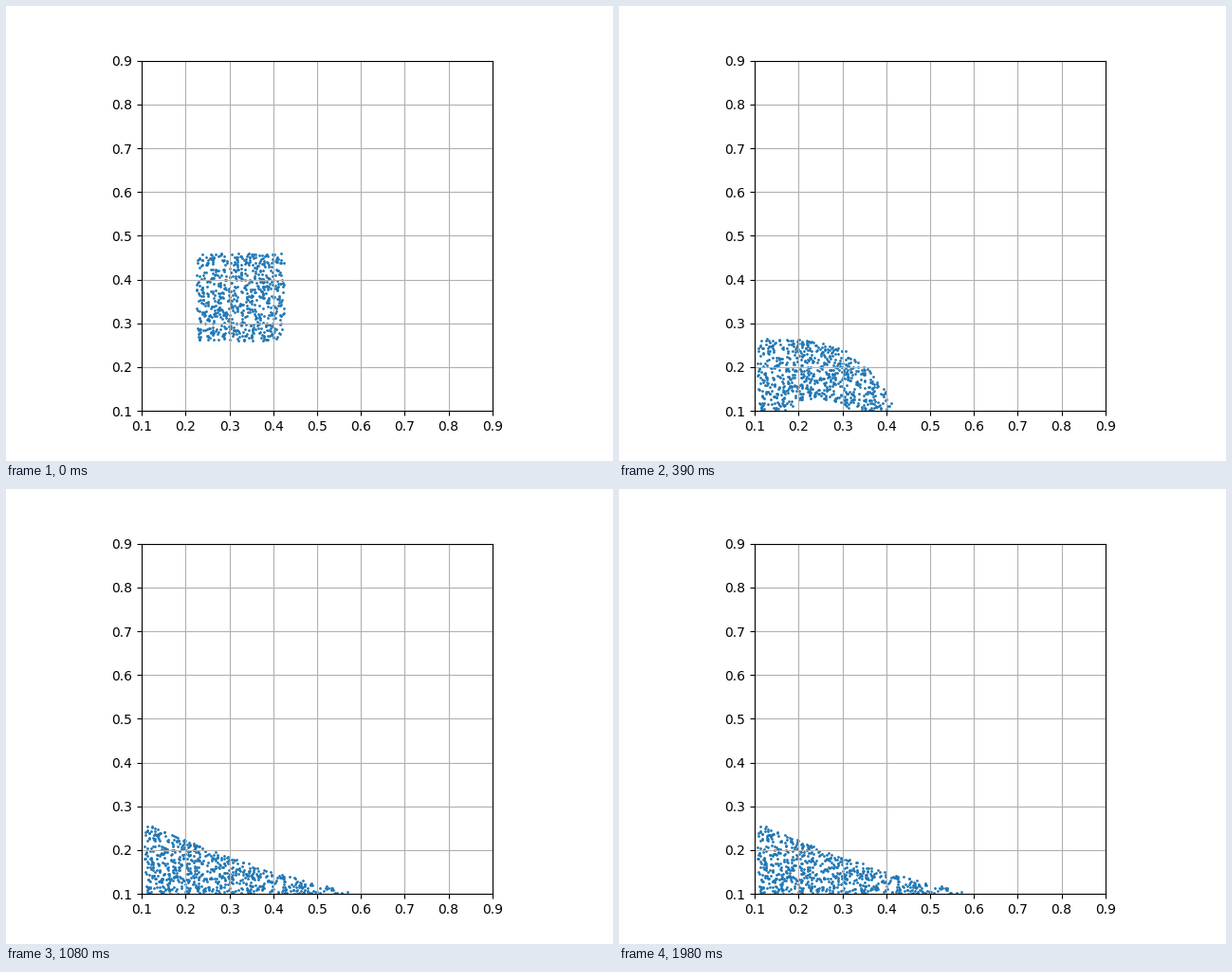
Recreate the animation shown at these times as a matplotlib script. Size 640x480 px, loop 2.1 s.

```python
import numpy as np
import matplotlib.pyplot as plt
from matplotlib.animation import FuncAnimation

FRAMES, STEP_MS = 70, 30
COUNT = 700
FLOOR, WALL = .1, .106
CONTACT, LANDED = 8, 13

rng = np.random.default_rng(7)
u, v = rng.random((2, COUNT))
grid = np.linspace(0, 1, 600)


def cumulative(f):
    c = np.concatenate([[0], np.cumsum((f[1:] + f[:-1]) / 2)])
    return c / c[-1]


def outline(s):
    """Height, width and the two curve exponents, s steps after landing."""
    height = .165 + .0163 * s * np.exp(-s / 4) - .003 * (1 - np.exp(-s / 8))
    width = .53 - .205 * np.exp(-s / 6)
    p = 1.42 - .22 * np.exp(-s / 6)
    q = 1 + 3 * np.exp(-s / 2.2)
    return height, width, p, q


def surface(z, p, q):
    return (1 - z ** q) ** p


def spread():
    """Fill the landed pile row by row; give column share and relative level."""
    _, _, p, q = outline(0)
    reach = (1 - grid ** (1 / p)) ** (1 / q)
    y = np.interp(v, cumulative(reach), grid)
    z = u * np.interp(y, grid, reach)
    share = np.interp(z, grid, cumulative(surface(grid, p, q)))
    return share, y / surface(z, p, q)


share, level = spread()


def falling(n):
    x = .2245 + .2 * u - .0076 * n
    y = .26 + .2 * v - .0114 * n - .00028 * n * n
    return np.column_stack([x, np.maximum(y, FLOOR)])


def pile(n):
    s = max(n - LANDED, 0)
    height, width, p, q = outline(s)
    z = np.interp(share, cumulative(surface(grid, p, q)), grid)
    x = WALL + width * z
    y = FLOOR + level * height * surface(z, p, q)
    # Gap left under the middle by the impact
    gap = .027 * np.exp(-s / 3 - ((x - .245) / .06) ** 4)
    return np.column_stack([x, y + gap * (1 - level)])


def positions(n):
    t = np.clip((n - CONTACT) / (LANDED - CONTACT), 0, 1) ** 2
    return (1 - t) * falling(n) + t * pile(n)


fig, ax = plt.subplots(figsize=(6.4, 4.8), dpi=100)
dots = ax.scatter(*positions(0).T, s=1)
ax.set_aspect("equal")
ax.set_xlim(.1, .9)
ax.set_ylim(.1, .9)
ax.grid(True)


def update(n):
    dots.set_offsets(positions(n))
    return (dots,)


anim = FuncAnimation(fig, update, frames=FRAMES, interval=STEP_MS,
                     repeat=True, repeat_delay=0)
plt.show()
```
